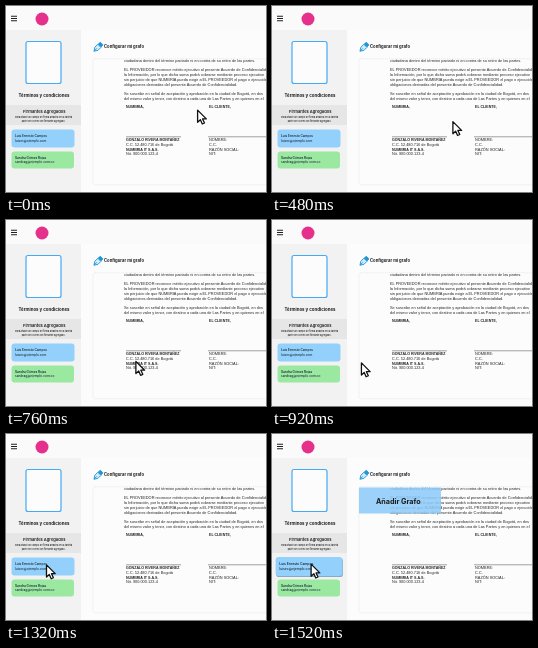
Write an HTML page that moves like this. It is 260 by 186 pixels and loops after 3000 ms.

```html
<!DOCTYPE html>
<html lang="es">
<head>
<meta charset="utf-8">
<style>
html, body { margin: 0; width: 100%; height: 100%; overflow: hidden; background: #fcfcfc; }
svg { display: block; width: 100vw; height: 100vh; }
text { font: 700 4.4px Inter, sans-serif; fill: #1c1c1c; }
.mid { text-anchor: middle; }
.note { font-size: 2.35px; font-weight: 500; }
.card text { font-size: 3.15px; font-weight: 500; fill: #1b2f3d; }
.card .b { font-weight: 600; }
.doc text { font: 3.88px "Liberation Sans", Arial, sans-serif; fill: #222; }
.doc .b { font-weight: 700; font-size: 3.6px; }
</style>
</head>
<body>
<svg viewBox="0 0 260 186">
  <clipPath id="page"><rect x="87" y="53.2" width="173" height="125"/></clipPath>

  <rect width="260" height="186" fill="#fcfcfc"/>
  <rect width="75" height="186" fill="#f2f2f2"/>
  <rect width="260" height="24" fill="#fafafa"/>
  <path d="M5 10.3h6M5 12.5h6M5 14.7h6" stroke="#222" stroke-width="1.1"/>
  <circle cx="36" cy="13" r="6.5" fill="#e5318c"/>

  <rect x="20" y="35.5" width="35" height="42" rx="2" fill="#fcfcfc" stroke="#45a9f5" stroke-width="1.2"/>
  <text class="mid" x="38" y="91">Términos y condiciones</text>
  <rect y="99" width="75" height="20" fill="#e6e6e6"/>
  <text class="mid" x="38.3" y="107.4" style="font-size:4.1px;font-weight:600">Firmantes Agregados</text>
  <text class="mid note" x="37.5" y="112">Para añadir un campo de firma arrastra en la tarjeta</text>
  <text class="mid note" x="37.5" y="115.5">parte del correo del firmante agregado.</text>

  <g class="card">
    <rect x="5.5" y="145.5" width="62.5" height="17" rx="3" fill="#9be8a0"/>
    <text class="b" x="9" y="152.6">Sandra Gómez Rojas</text>
    <text x="9" y="157.4">sandrag@ejemplo.com.co</text>
  </g>
  <g class="card" id="card">
    <rect id="shade" x="6" y="124.5" width="63" height="18" rx="3" fill="#5b8db0"/>
    <rect x="5.5" y="123.5" width="63" height="18" rx="3" fill="#93d0fc"/>
    <text class="b" x="9" y="131.4">Luis Ernesto Campos</text>
    <text x="9" y="136.2">luisec@ejemplo.com</text>
  </g>

  <g transform="translate(88 45.2) rotate(-45)" fill="#d5eefc" stroke="#2196d6" stroke-width=".9" stroke-linejoin="round">
    <path d="M0 0L3.4-2.2H7.6V2.2H3.4ZM0 0H4"/>
    <rect x="8" y="-2" width="2.8" height="4" rx=".6" fill="#2196d6"/>
  </g>
  <text x="98" y="42.3" style="font-size:4.2px">Configurar mi grafo</text>

  <rect x="87" y="52.8" width="180" height="126" rx="2" fill="none" stroke="#ddd" stroke-width=".6" stroke-dasharray="1.2 .8"/>
  <g class="doc" id="doc" clip-path="url(#page)">
    <path d="M120 130.8h55M202 130.8h58" stroke="#444" stroke-width=".5"/>
  </g>

  <g id="drop">
    <rect x="87" y="53.5" width="82" height="26" fill="#8ccbfa" opacity=".85"/>
    <text x="104" y="69.7" style="font-size:7.2px">Añadir Grafo</text>
  </g>
  <path id="cursor" d="M.6.6V12.8L3.4 10.2L5.3 14.5L7.5 13.5L5.6 9.4H9.3Z" fill="#fff" stroke="#111" stroke-width="1.3" stroke-linejoin="round"/>
</svg>
<script>
const $ = id => document.getElementById(id);

function write(x, y, text, bold) {
  const el = document.createElementNS("http://www.w3.org/2000/svg", "text");
  el.setAttribute("x", x);
  el.setAttribute("y", y);
  if (bold) el.setAttribute("class", "b");
  el.textContent = text;
  $("doc").append(el);
}

write(118, 55.6, "ciudadana dentro del término pactado ni en contra de su retiro de las partes.");
write(118, 65.3, "EL PROVEEDOR reconoce mérito ejecutivo al presente Acuerdo de Confidencialidad");
write(118, 70.2, "la Información, por lo que dicha suma podrá cobrarse mediante proceso ejecutivo");
write(118, 75, "sin perjuicio de que NUMBRIA pueda exigir a EL PROVEEDOR el pago o ejecución");
write(118, 79.8, "obligaciones derivadas del presente Acuerdo de Confidencialidad.");
write(118, 88.9, "Se suscribe en señal de aceptación y aprobación en la ciudad de Bogotá, en dos");
write(118, 94, "del mismo valor y tenor, con destino a cada una de Las Partes y en quienes en el");
write(120, 102.3, "NUMBRIA,", true);
write(203, 102.3, "EL CLIENTE,", true);
write(120, 135.2, "GONZALO RIVERA MONTAÑEZ", true);
write(120, 139.9, "C.C. 52.480.716 de Bogotá");
write(120, 144.5, "NUMBRIA IT S.A.S.", true);
write(120, 149.4, "Nit. 900.000.123-4");
["NOMBRE:", "C.C.", "RAZÓN SOCIAL:", "NIT:"].forEach((s, i) => write(203, 135.2 + i * 4.7, s));

const clamp = v => Math.min(1, Math.max(0, v));
const smooth = u => u * u * (3 - 2 * u);

function draw() {
  const t = Math.floor((performance.now() % 3000) / 40) * 40;
  const go = clamp((t - 280) / 560);
  const back = clamp((t - 840) / 560);
  const lift = clamp((t - 1400) / 120);

  // Sideways the two legs form one ease-in-out; each leg eases vertically
  const x = 191 - 84 * go ** 2 - 68.5 * (1 - (1 - back) ** 2);
  const y = 103.5 + 39.5 * smooth(go) - 13.5 * smooth(back);
  $("cursor").setAttribute("transform", `translate(${x} ${y})`);

  const k = 1 + 0.06 * lift;
  $("card").setAttribute("transform", `translate(37 132.5) scale(${k}) translate(-37 -132.5)`);
  $("shade").setAttribute("opacity", lift * 0.7);
  $("drop").setAttribute("opacity", lift);
  requestAnimationFrame(draw);
}
draw();
</script>
</body>
</html>
```
